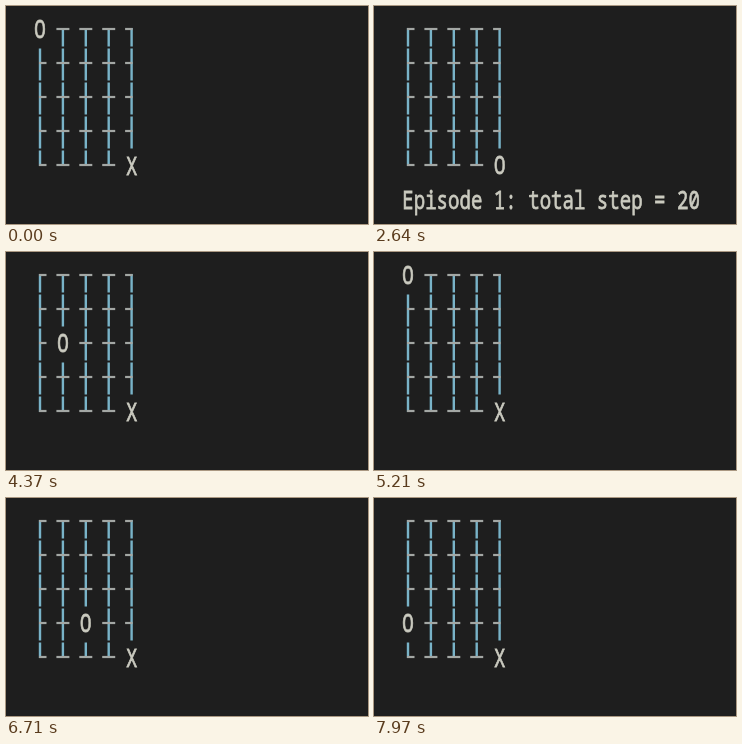
Animation of 362 by 218 pixels, one loop 8000 ms. Source, as an HTML page with a canvas:

```html
<!DOCTYPE html>
<html>
<head>
<meta charset="utf-8">
<style>
  html, body { margin: 0; width: 362px; height: 218px; overflow: hidden; background: #1e1e1e; }
  canvas { display: block; filter: blur(.65px); }
</style>
</head>
<body>
<canvas id="stage" width="362" height="218"></canvas>
<script>
const ctx = document.getElementById('stage').getContext('2d');
const LOOP = 8000, STEP = 119, SIZE = 5;
const CHAR = 11.45, LINE = 34, LEFT = 34, TOP = 23;
const DIRS = { U: [0, -1], D: [0, 1], L: [-1, 0], R: [1, 0], '.': [0, 0] };

// Each episode starts in the top left corner; walls stop a move.
const EPISODES = [
  { start: 1070 - STEP, path: 'DRUD.RDRDRD' },
  { start: 3100, path: 'RDLLDDRURL' + 'ULDRUULLDDRRDL' + 'LLURDR' + 'UUULDDRDLL' }
];

const clamp = v => Math.max(0, Math.min(SIZE - 1, v));
const colX = c => LEFT + c * 2 * CHAR;
const rowY = r => TOP + r * LINE;

function agentAt(t) {
  const { start, path } = EPISODES[t < 3100 ? 0 : 1];
  const count = Math.max(0, Math.floor((t - start) / STEP));
  let x = 0, y = 0;
  for (const move of path.slice(0, count)) {
    x = clamp(x + DIRS[move][0]);
    y = clamp(y + DIRS[move][1]);
  }
  return { x, y };
}

function bar(x, y, w, h, color) {
  ctx.fillStyle = color;
  ctx.fillRect(x, y, w, h);
}

function drawNode(c, r) {
  const x = colX(c), y = rowY(r);
  const up = r ? 14.5 : 1, down = r < SIZE - 1 ? 17.5 : 1;
  const left = c ? 6.5 : 1, right = c < SIZE - 1 ? 6.5 : 1;
  bar(x - 1.2, y - up, 2.4, up + down, '#79b3c8');
  bar(x - left, y - 1.1, left + right, 2.2, '#a3a7a4');
}

function write(text, x, y, align) {
  ctx.save();
  ctx.translate(x, y);
  ctx.scale(1, 1.32); // tall terminal cells
  ctx.font = '500 19.08px "Noto Sans Mono", monospace';
  ctx.textAlign = align;
  ctx.fillStyle = ctx.strokeStyle = '#cbcbc0';
  ctx.lineWidth = .6;
  ctx.fillText(text, 0, 0);
  ctx.strokeText(text, 0, 0);
  ctx.restore();
}

function draw(t) {
  ctx.clearRect(0, 0, 362, 218);
  const agent = agentAt(t), last = SIZE - 1;
  for (let r = 0; r < SIZE; r++) {
    for (let c = 0; c < SIZE; c++) {
      const here = agent.x === c && agent.y === r;
      if (here) write('O', colX(c), rowY(r) + 9, 'center');
      else if (c === last && r === last) write('X', colX(c), rowY(r) + 9.5, 'center');
      else drawNode(c, r);
    }
  }
  if (agent.x === last && agent.y === last)
    write('Episode 1: total step = 20', LEFT - CHAR / 2, rowY(SIZE) + 9.5, 'left');
}

function frame() {
  draw(performance.now() % LOOP);
  requestAnimationFrame(frame);
}
frame();
</script>
</body>
</html>
```
